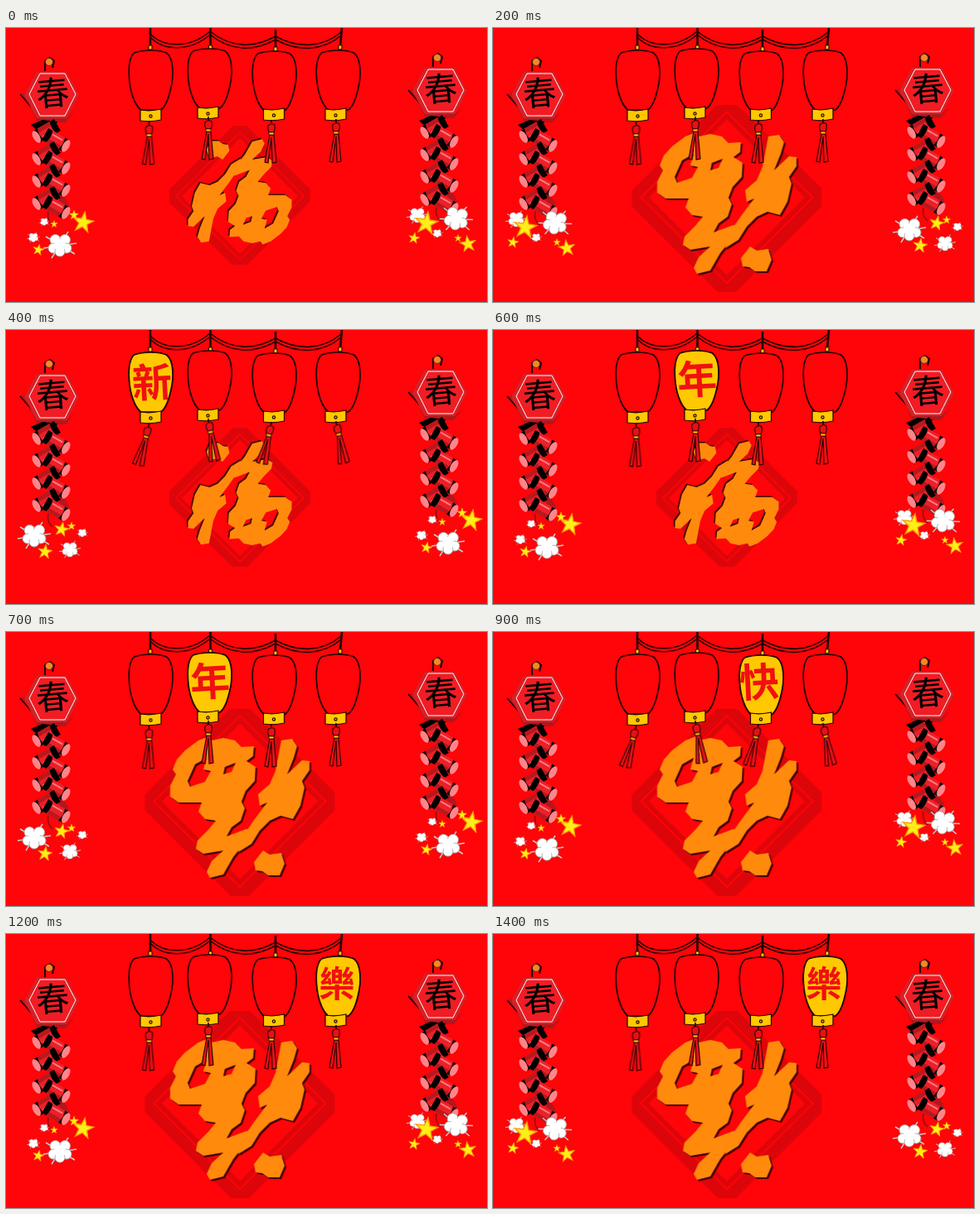
Write an HTML page without scripts that moves like this. It is 580 px wide and 331 px high and loops after 1500 ms.

```html
<!DOCTYPE html>
<html lang="zh-Hant">
<head>
<meta charset="utf-8">
<title>新年快樂</title>
<style>
  html, body { margin: 0; height: 100%; overflow: hidden; background: #ff0408; }
  svg { display: block; width: 580px; height: 331px; }
  text { font-family: "Noto Sans CJK TC", "Noto Sans CJK SC", "Noto Sans CJK JP", "Noto Sans CJK", sans-serif; text-anchor: middle; }

  .fu { transform-origin: 282px 202px; animation: flip 1.5s step-end infinite; }
  .tassel { animation: swing 1.5s step-end infinite; }
  .lit { animation: light 1.5s step-end infinite; animation-delay: var(--at); }
  .burst { animation: burst .3s step-end infinite; }
  .second { animation-delay: -.2s; }
  .third { animation-delay: -.1s; }

  @keyframes flip {
    0%, 26.666%, 66.666% { transform: none; }
    13.333%, 46.666%, 80% { transform: translateY(4px) rotate(180deg) scale(1.345); }
  }
  @keyframes swing {
    0%, 40%, 80%, 100% { transform: none; }
    20%, 60% { transform: rotate(var(--swing)); }
  }
  @keyframes light { 0% { visibility: visible; } 20%, 100% { visibility: hidden; } }
  @keyframes burst { 0% { visibility: visible; } 33.333%, 100% { visibility: hidden; } }
</style>
</head>
<body>
<svg viewBox="0 0 580 331">
  <defs>
    <path id="body" d="M-20 30C-9 26 10 26 19 30C28 37 28 58 24 74C21 87 17 96 12 99H-12C-20 92 -25 76 -26 60C-27 46 -26 36 -20 30Z"
      stroke="#200" stroke-width="1.7"/>
    <g id="cap" fill="#ffc800" stroke="#200" stroke-width="1.2">
      <path d="M-12.5 99Q0 101 12.5 98V111Q0 114 -12.5 112Z"/>
      <circle cy="106.5" r="1.6"/>
    </g>
    <g id="cord" stroke="#200">
      <path d="M0 0V28" stroke-width="2.6"/>
      <path d="M-2 21h4v5h-4z" fill="#ffc800"/>
    </g>
    <g id="tassel" fill="#e81018" stroke="#200" stroke-width="1.1">
      <path d="M0 -1V5" stroke-width="1.6"/>
      <path d="M-2 17L-8 50L-4 51L0 20L1 51L6 50L3 17Z"/>
      <path d="M-4 6Q0 2 4 5Q5 10 3 14H-3Q-5 10 -4 6Z"/>
      <path d="M-3 14H3V17H-3Z" fill="#ffc800" stroke-width=".8"/>
    </g>

    <!-- brush character, drawn upside down at its large size -->
    <g id="ink" fill-rule="evenodd">
      <path d="M232 131L245 126L249 131L262 128L276 131L284 139L299 138L298 150L290 156L301 163L300 180L289 192L284 205L288 213L283 228L272 236L266 247L290 238L298 241L290 252L274 272L262 293L246 297L242 290L248 277L262 264L238 268L229 262L231 252L244 239L253 228L240 226L232 217L236 206L208 206L198 199V186L205 172L201 166L206 154L216 143Z
        M242 152L228 160L219 180L222 187L240 181L247 168L238 166Z
        M264 163L277 158L272 169L262 172Z"/>
      <path d="M332 131L345 129L351 138L347 152L339 172L357 155L366 156V167L357 180L360 188L355 210L346 226L331 222L318 228L306 240L296 256L280 266L286 246L300 226L315 206L306 210L304 196L318 184L325 168Z"/>
      <path d="M299 278L310 264L318 269L332 267L336 280L330 294L316 294L309 289L301 288Z"/>
    </g>

    <polygon id="star" points="0,-1 .24,-.33 .95,-.31 .38,.12 .59,.81 0,.4 -.59,.81 -.38,.12 -.95,-.31 -.24,-.33"
      fill="#ffee18" stroke="#ff9d00" stroke-width=".1"/>
    <g id="puff">
      <path d="M-17 -10L18 11M-10 16L10 -16M-20 4L20 -2" stroke="#ccc" stroke-width="1.5"/>
      <g fill="#fff" stroke="#aaa" stroke-width=".9">
        <circle cx="-5.5" cy="-6" r="6.5"/><circle cx="6" cy="-6" r="6.5"/>
        <circle cx="8" cy="4" r="6"/><circle cx="-8" cy="4" r="6"/><circle cx="0" cy="8" r="6"/>
      </g>
      <circle r="7" fill="#fff"/>
    </g>

    <g id="burst-a">
      <use href="#star" transform="translate(93 235) rotate(10) scale(13)"/>
      <use href="#star" transform="translate(82 226) scale(6)"/>
      <use href="#star" transform="translate(58 237) scale(4.5)"/>
      <use href="#star" transform="translate(39 268) rotate(12) scale(7)"/>
      <use href="#puff" transform="translate(46 234) scale(.32)"/>
      <use href="#puff" transform="translate(33 253) scale(.4)"/>
      <use href="#puff" transform="translate(65 262)"/>
    </g>
    <g id="burst-b">
      <use href="#puff" transform="translate(28 231) scale(.65)"/>
      <use href="#puff" transform="translate(75 235) rotate(10)"/>
      <use href="#puff" transform="translate(52 253) scale(.35)"/>
      <use href="#star" transform="translate(39 241) rotate(8) scale(14)"/>
      <use href="#star" transform="translate(24 259) rotate(10) scale(7)"/>
      <use href="#star" transform="translate(89 266) rotate(-8) scale(10)"/>
      <use href="#star" transform="translate(77 259) scale(4.5)"/>
    </g>
    <g id="burst-c">
      <use href="#puff" transform="translate(34 248)"/>
      <use href="#puff" transform="translate(77 265) scale(.65)"/>
      <use href="#puff" transform="translate(92 245) scale(.35)"/>
      <use href="#star" transform="translate(67 241) rotate(12) scale(9)"/>
      <use href="#star" transform="translate(79 237) scale(5)"/>
      <use href="#star" transform="translate(47 268) rotate(8) scale(9)"/>
    </g>

    <!-- one cracker points right, pink end outward -->
    <g id="cracker">
      <path d="M-15 -8H13V8H-15Z" fill="#ec2028"/>
      <path d="M-15 3H13V8H-15Z" fill="#b8181e"/>
      <path d="M-8 -4H6" stroke="#ff7a80" stroke-width="2"/>
      <path d="M-16 -8H-10Q-7 0 -10 8H-16ZM7 -8H12V8H7Q10 0 7 -8Z"/>
      <ellipse cx="13" rx="4" ry="8" fill="#ff858a"/>
    </g>
    <g id="row">
      <use href="#cracker" transform="translate(48 125) rotate(150)"/>
      <use href="#cracker" transform="translate(61 136) rotate(30)"/>
    </g>
    <g id="string">
      <path d="M47 52V40L53 36L58 40L56 48" fill="none" stroke="#200" stroke-width="2"/>
      <circle cx="52" cy="41" r="4.5" fill="#f28a20" stroke="#622"/>
      <path d="M17 80L27 90L38 114H72L82 101L74 108H39L23 79Z" fill="#b3161c"/>
      <path d="M17 80L31 96" stroke="#200" stroke-width="1.5"/>
      <path d="M22 81L37 53H73L88 81L73 109H37Z" fill="#d42228"/>
      <path d="M28 80L41 55H71L84 80L71 106H41Z" fill="#f21c24" stroke="#fff"/>
      <text x="56" y="93" font-size="40" transform="rotate(-5 56 78)">春</text>
      <path d="M64 200Q79 208 76 226L66 231Z" fill="#b3161c"/>
      <path d="M51 222Q49 232 56 238" fill="none" stroke="#8a1014" stroke-width="1.5"/>
      <path d="M30 117L44 111L62 113L58 122L40 126Z"/>
      <use href="#row"/>
      <use href="#row" y="27"/>
      <use href="#row" y="54"/>
      <use href="#row" y="81"/>
    </g>
  </defs>

  <rect width="580" height="331" fill="#ff0408"/>

  <g class="fu">
    <path d="M274 118H290L367 195V209L291 286H273L197 211V195Z" fill="#dc060a"/>
    <path d="M282 126L359 203L282 280L205 203Z" fill="none" stroke="#ff0408" stroke-width="1.5"/>
    <path d="M282 133L352 203L282 273L212 203Z" fill="#ff0408"/>
    <g transform="translate(282 202) scale(-.7435) translate(-282 -206)">
      <use href="#ink" x="2" y="2" fill="#400"/>
      <use href="#ink" fill="#ff8a0c"/>
    </g>
  </g>

  <g fill="none" stroke="#200" stroke-width="1.6">
    <path id="rope" d="M174 11C190 28 222 29 246 8C272 29 300 28 325 14C352 29 382 28 404 9"/>
    <use href="#rope" y="-4"/>
  </g>
  <use href="#cord" x="174"/>
  <use href="#cord" x="246.500"/>
  <use href="#cord" x="325" y="2"/>
  <use href="#cord" transform="translate(405 0) rotate(5)"/>

  <g fill="#ff0408">
    <use href="#body" x="174.500"/>
    <use href="#body" x="245.500" y="-2"/>
    <use href="#body" x="323.500" y="1"/>
    <use href="#body" x="400.500"/>
  </g>

  <g fill="#ffc800" font-size="48" font-weight="700">
    <g class="lit" style="--at:-1.2s">
      <use href="#body" x="174.500"/>
      <text x="176" y="81" fill="#f01010" transform="rotate(-3 176 63)">新</text>
    </g>
    <g class="lit" style="--at:-.9s">
      <use href="#body" x="245.500" y="-2"/>
      <text x="246" y="77" fill="#f01010" transform="rotate(-3 246 60)">年</text>
    </g>
    <g class="lit" style="--at:-.6s">
      <use href="#body" x="323.500" y="1"/>
      <text x="321" y="78" fill="#f01010" transform="rotate(-3 321 61)">快</text>
    </g>
    <g class="lit" style="--at:-.3s">
      <use href="#body" x="400.500"/>
      <text x="399" y="76" font-size="43" fill="#f01010">樂</text>
    </g>
  </g>

  <use href="#cap" x="174.500"/>
  <use href="#cap" x="243.500" y="-3"/>
  <use href="#cap" x="323" y="-1"/>
  <use href="#cap" x="397.500" y="-1"/>

  <g transform="translate(172.500 114)"><g class="tassel" style="--swing:14deg"><use href="#tassel"/></g></g>
  <g transform="translate(244 108)"><g class="tassel" style="--swing:-10deg"><use href="#tassel"/></g></g>
  <g transform="translate(320 112)"><g class="tassel" style="--swing:12deg"><use href="#tassel"/></g></g>
  <g transform="translate(398 111)"><g class="tassel" style="--swing:-12deg"><use href="#tassel"/></g></g>

  <use href="#string"/>
  <use href="#burst-a" class="burst"/>
  <use href="#burst-c" class="burst second"/>
  <use href="#burst-b" class="burst third"/>

  <g transform="translate(468 -5)">
    <use href="#string"/>
    <use href="#burst-b" class="burst"/>
    <use href="#burst-a" class="burst second"/>
    <use href="#burst-c" class="burst third"/>
  </g>
</svg>
</body>
</html>
```
